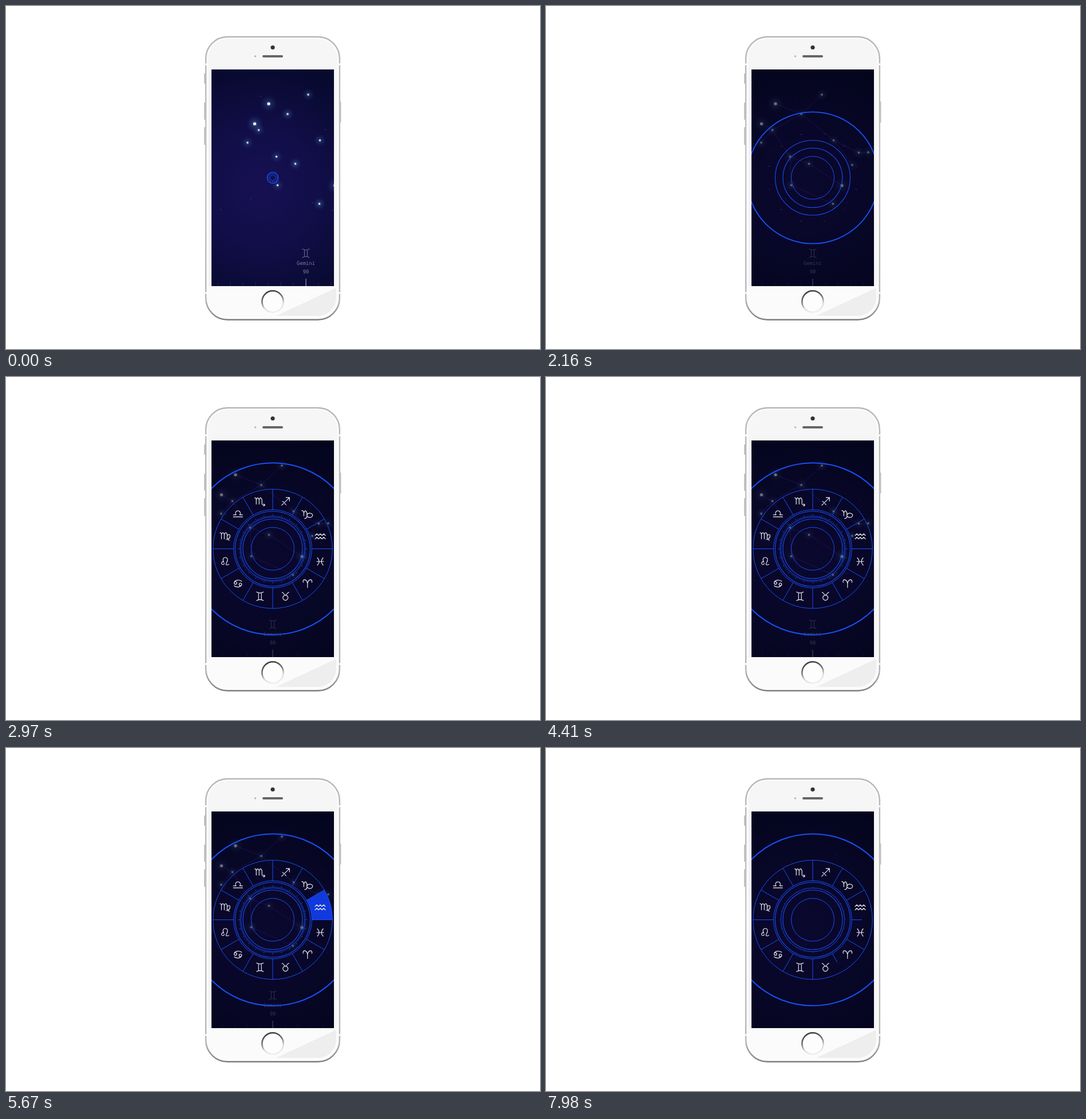
Write an HTML page that moves like this. It is 933 px wide and 600 px high and loops after 8000 ms.

```html
<!DOCTYPE html>
<html lang="en">
<head>
<meta charset="utf-8">
<title>Zodiac wheel</title>
<style>
  html, body { margin: 0; width: 100%; height: 100%; overflow: hidden; background: #fff; }
  svg { display: block; width: 933px; height: 600px; }
  text { font: 8.8px "DejaVu Sans Mono", monospace; text-anchor: middle; fill: #a0a5bd; }
  .line { fill: none; stroke: #1750f5; }
  .glyph { fill: none; stroke: #eef0f6; stroke-width: 1.15; stroke-linecap: round; stroke-linejoin: round; }
</style>
</head>
<body>
<svg viewBox="0 0 933 600">
  <defs>
    <clipPath id="screen"><rect x="359" y="111" width="214" height="379"/></clipPath>
    <radialGradient id="night" gradientUnits="userSpaceOnUse" cx="447" cy="318" r="225">
      <stop offset="0" stop-color="#171052"/>
      <stop offset=".45" stop-color="#110e48"/>
      <stop offset="1" stop-color="#07092d"/>
    </radialGradient>
    <radialGradient id="glow">
      <stop offset="0" stop-color="#7fb0e0" stop-opacity=".6"/>
      <stop offset=".35" stop-color="#4a80b8" stop-opacity=".25"/>
      <stop offset="1" stop-color="#305a9a" stop-opacity="0"/>
    </radialGradient>
    <linearGradient id="metal" x1="0" y1="0" x2="0" y2="1">
      <stop offset="0" stop-color="#b4b4b4"/>
      <stop offset=".5" stop-color="#c6c6c6"/>
      <stop offset=".93" stop-color="#b4b4b4"/>
      <stop offset="1" stop-color="#787878"/>
    </linearGradient>
    <linearGradient id="button" x1=".2" y1="0" x2=".5" y2="1">
      <stop offset="0" stop-color="#333"/>
      <stop offset=".45" stop-color="#777"/>
      <stop offset=".75" stop-color="#ddd"/>
      <stop offset="1" stop-color="#eee"/>
    </linearGradient>
  </defs>

  <g fill="#c2c2c2">
    <rect x="346" y="118" width="3" height="18" rx="1"/>
    <rect x="346" y="169" width="3" height="30" rx="1"/>
    <rect x="346" y="212" width="3" height="31" rx="1"/>
    <rect x="583" y="167" width="2.5" height="37" rx="1"/>
  </g>
  <rect x="349" y="53.8" width="234" height="495" rx="38" fill="#ececec" stroke="url(#metal)" stroke-width="2.2"/>
  <rect x="352" y="56.5" width="228" height="489" rx="35" fill="#f6f6f6" stroke="#fff" stroke-width="1.5"/>
  <path d="M348 102h3M348 502h3M581 102h3M581 502h3" stroke="#fff" stroke-width="3"/>
  <path d="M352 490H580V511A35 35 0 0 1 545 545H387A35 35 0 0 1 352 511Z" fill="#fbfbfb"/>
  <path d="M472 542L577 493V511A32 32 0 0 1 545 542Z" fill="#eee"/>
  <circle cx="466" cy="72.5" r="3.6" fill="#333"/>
  <circle cx="435.5" cy="88" r="1.8" fill="#bbb"/>
  <rect x="448" y="86" width="36" height="4" rx="2" fill="#666"/>
  <circle cx="466" cy="517" r="18.7" fill="#fdfdfd" stroke="url(#button)" stroke-width="2.5"/>

  <g clip-path="url(#screen)">
    <rect x="359" y="111" width="214" height="379" fill="url(#night)"/>
    <g id="far" fill="#7080c8" opacity=".35"></g>
    <g id="links" stroke="#4c22a8" stroke-width=".9"></g>
    <g id="stars"></g>
    <g id="label">
      <g id="scale" stroke="#2a4590" stroke-width=".8" opacity=".6"></g>
      <path d="M466 477V490" stroke="#aab0c8"/>
      <g opacity=".72">
        <g id="sign" transform="translate(466 432.5)" opacity=".55"></g>
        <text x="466" y="453">Gemini</text>
        <text x="466" y="468">90</text>
      </g>
    </g>
    <rect id="shade" x="359" y="111" width="214" height="379" fill="#030312"/>
    <g id="wheel" transform="translate(466 300.5)">
      <path id="pick" fill="#1239dd"/>
      <g id="ticks" class="line" stroke-width="1"></g>
      <g id="spokes" class="line" stroke-width="1"></g>
      <g id="rings" class="line"></g>
      <g id="icon" class="line">
        <circle r="5" stroke-width=".9"/>
        <circle r="7" stroke-width="1.3" stroke-dasharray="1.3 2.365"/>
      </g>
      <circle id="outer" class="line"/>
      <g id="glyphs"></g>
    </g>
  </g>
</svg>
<script>
const LOOP = 8000;
const $ = id => document.getElementById(id);
const clamp = v => Math.max(0, Math.min(1, v));
const span = (t, from, to) => clamp((t - from) / (to - from));
const easeOut = p => 1 - (1 - p) ** 3;
const easeInOut = p => p < .5 ? 4 * p ** 3 : 1 - (2 - 2 * p) ** 3 / 2;

function set(el, attrs) {
  for (const key in attrs) el.setAttribute(key, attrs[key]);
  return el;
}
function add(parent, tag, attrs) {
  const el = document.createElementNS('http://www.w3.org/2000/svg', tag);
  parent.append(el);
  return set(el, attrs);
}
const polar = (r, deg) => [r * Math.cos(deg * Math.PI / 180), r * Math.sin(deg * Math.PI / 180)];

// Clockwise, beginning just above the right-hand spoke.
const SIGNS = [
  'M-9-1l3-3 3 3 3-3 3 3 3-3 3 3M-9 5l3-3 3 3 3-3 3 3 3-3 3 3',
  'M-5-6.5q6 6.5 0 13M5-6.5q-6 6.5 0 13M-6 0H6',
  'M-7.5-2c-2-6 6-7 7.5 2V7M0 0c1.5-9 9.5-8 7.5-2',
  'M-6-7c3 0 3 5 6 5s3-5 6-5M0-2a4.5 4.5 0 1 1-.1 0',
  'M-6-7.5q6 3.5 12 0M-6 7.5q6-3.5 12 0M-2.5-6v12M2.5-6v12',
  'M-6.5-2c2-5 9-5 13-2M-2-1a2.3 2.3 0 1 1-4.6 0a2.3 2.3 0 1 1 4.6 0M6.5 2c-2 5-9 5-13 2M2 1.5a2.3 2.3 0 1 0 4.6 0a2.3 2.3 0 1 0-4.6 0',
  'M-1.5 3a2.4 2.4 0 1 1-1-2C-4-1-5-7 0-7s5 5 2.5 9 0 5 4 3',
  'M-9-6q2.5 0 2.5 3V5M-6.5-3q2.5-6 5 0V5M-1.5-3q2.5-6 5 0V3q0 4 4 4M3.5-1q5-4 5 1t-7 6',
  'M8 5H-8M8 1.5H3a4.2 4.2 0 1 0-6 0H-8',
  'M-9-6q2.5 0 2.5 3V5M-6.5-3q2.5-6 5 0V5M-1.5-3q2.5-6 5 0V4q0 3 5 2.5M6.5 4.5l2.2 2-2.2 2',
  'M7-6.5L-6.5 7M1-6.5H7V-.5M-5 0L1 6',
  'M-10-6q3 0 3.5 4V3M-6.5-2q3-7 5.500 0V4q0 3.500-4 4M-1 2a5 3.800 0 1 1 .3 1.500'
];
const glyphs = SIGNS.map((d, i) => ({
  angle: i * 30 - 15, el: add($('glyphs'), 'path', { d, class: 'glyph' })
}));
add($('sign'), 'path', { d: SIGNS[4], class: 'glyph' });

// x, y, and 1 for a bright star.
const STARS = [
  [401, 171, 1], [446, 189], [482, 155], [395.5, 217], [376.5, 206, 1], [376, 239], [426.5, 263.5],
  [459.5, 276], [517, 314, 1], [428.5, 313.5], [501.5, 346], [502.5, 235], [546.5, 256.5], [563, 256], [535, 278]
];
const LINKS = [
  [0, 1], [2, 1], [1, 3], [4, 3], [3, 5], [3, 6], [6, 7], [7, 8], [6, 9], [9, 10], [1, 11], [11, 12], [12, 13], [11, 14]
];
const stars = STARS.map(([x, y, bright]) => {
  const group = add($('stars'), 'g', {});
  const glow = add(group, 'circle', { cy: y, r: bright ? 15 : 11, fill: 'url(#glow)' });
  const core = add(group, 'circle', { cy: y, r: bright ? 2.6 : 1.7, fill: bright ? '#fff' : '#d5e2ee' });
  return { x, y, glow, core, drift: bright ? 58 : 46, now: x };
});
const links = LINKS.map(([a, b]) => ({ a: stars[a], b: stars[b], el: add($('links'), 'line', {}) }));

for (const [x, y] of [[549, 216], [419, 337], [366, 356], [526, 344], [436, 158], [562, 357], [578, 187]])
  add($('far'), 'circle', { cx: x, cy: y, r: .9 });
for (let i = -11; i <= 11; i++)
  add($('scale'), 'path', { d: `M${466 + i * 22} 490v-${i % 2 ? 5 : 7}` });

const rings = [[37.5, 1], [52, 1.1], [65.5, 1.1], [68.3, 1], [104.3, 1], [55.5, .7]].map(([r, width]) =>
  ({ r, el: add($('rings'), 'circle', { 'stroke-width': width }) }));
const ticks = Array.from({ length: 120 }, (_, i) => ({
  angle: i * 3, size: i % 5 ? 2.8 : 4.8, el: add($('ticks'), 'line', {})
}));
const spokes = Array.from({ length: 12 }, (_, i) => ({ angle: i * 30, el: add($('spokes'), 'line', {}) }));

function ray(el, angle, from, to) {
  const [x1, y1] = polar(from, angle), [x2, y2] = polar(to, angle);
  set(el, { x1, y1, x2, y2, visibility: to - from < .05 ? 'hidden' : 'visible' });
}
{
  const [ax, ay] = polar(104.3, -30), [bx, by] = polar(68, -30);
  set($('pick'), { d: `M${bx} ${by}L${ax} ${ay}A104.3 104.3 0 0 1 104.3 0H68A68 68 0 0 0 ${bx} ${by}` });
}

function drawSky(t) {
  const scroll = 1 - easeOut(span(t, 30, 690)) - 8 * easeInOut(span(t, 6390, 7950));
  stars.forEach((s, i) => {
    s.now = s.x + s.drift * scroll;
    set(s.core, { cx: s.now });
    set(s.glow, { cx: s.now, opacity: .85 + .15 * Math.sin(t / 260 + i * 2) });
  });
  const grow = easeInOut(span(t, 830, 1290));
  set($('links'), { opacity: grow });
  for (const { a, b, el } of links)
    set(el, { x1: a.now, y1: a.y, x2: a.now + (b.now - a.now) * grow, y2: a.y + (b.y - a.y) * grow });
  set($('far'), { transform: `translate(${9 * scroll})` });
  set($('label'), { transform: `translate(${58 * scroll})` });
}

function drawWheel(t) {
  const open = easeOut(span(t, 1950, 2520));
  const inner = easeOut(span(t, 1950, 2150));
  const late = easeOut(span(t, 2170, 2700));
  const press = 1 - .16 * Math.sin(Math.PI * span(t, 1480, 1690));

  set($('shade'), { opacity: .57 * span(t, 1950, 2150) });
  set($('outer'), { r: (9.5 + 140.8 * open) * press, 'stroke-width': 1.6 + .4 * open });
  set($('icon'), { opacity: 1 - span(t, 1950, 2060), transform: `scale(${press * (1 + 4 * inner)})` });

  rings.forEach(({ r, el }, i) => {
    const p = i < 3 ? inner : late;
    const start = i < 3 ? 5 : i < 5 ? 65 : 52;
    set(el, { r: start + (r - start) * p, opacity: Math.min(1, p * 2) });
  });

  const tickSize = late * (1 - .65 * span(t, 7740, 7980));
  for (const { angle, size, el } of ticks) ray(el, angle, 55.5, 55.5 + size * tickSize);
  for (const { angle, el } of spokes) {
    const cut = angle === 0 || angle === 60 ? span(t, 7830, 7980) * .5 : 0;
    ray(el, angle, 68, 68 + 36.3 * late * (1 - cut));
  }

  // Each sign starts as a speck and moves outward while it grows.
  const size = easeOut(span(t, 2145, 2700));
  for (const { angle, el } of glyphs) {
    const [x, y] = polar(78 + 8 * size, angle);
    set(el, { transform: `translate(${x} ${y}) scale(${size})` });
  }
  set($('pick'), { opacity: span(t, 5200, 5500) * (1 - span(t, 5920, 6180)) });
}

const begin = performance.now();
function frame() {
  const t = (performance.now() - begin) % LOOP;
  drawSky(t);
  drawWheel(t);
  requestAnimationFrame(frame);
}
frame();
</script>
</body>
</html>
```
